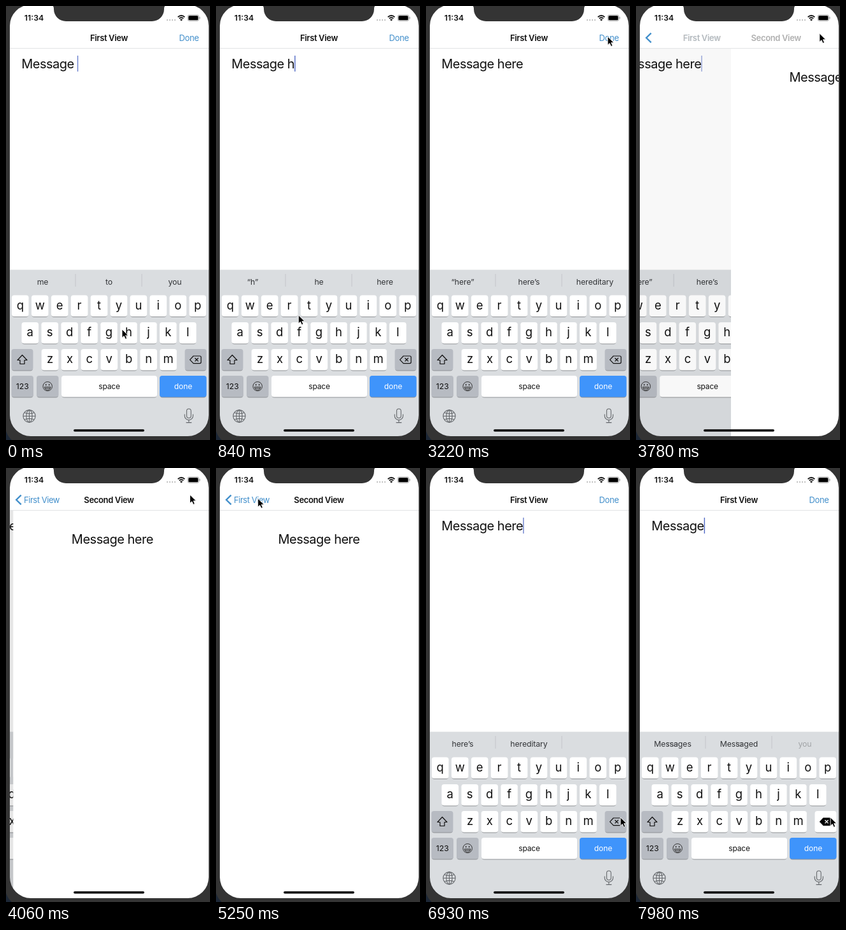
An HTML page for the animation above (8000 ms loop, 320 by 682 pixels).

```html
<!DOCTYPE html>
<html lang="en">
<head>
<meta charset="utf-8">
<title>Message form</title>
<style>
  html, body { margin: 0; width: 100%; height: 100%; overflow: hidden; background: #343434; }
  svg { display: block; width: 320px; height: 682px; }
  text { font-family: Inter, "Open Sans", sans-serif; font-optical-sizing: none; }
</style>
</head>
<body>
<svg id="stage" viewBox="0 0 320 682"></svg>
<script>
const LOOP = 8000, MID = 161.5, BLUE = '#428fcb';
const MESSAGE = 'Message\u00a0here';
const stage = document.getElementById('stage');

function el(tag, attrs, parent = stage) {
  const node = document.createElementNS('http://www.w3.org/2000/svg', tag);
  set(node, attrs);
  parent.appendChild(node);
  return node;
}
function set(node, attrs) {
  for (const k in attrs) node.setAttribute(k, attrs[k]);
}
const group = (parent = stage) => el('g', {}, parent);
const rect = (x, y, width, height, fill, parent, rx = 0) =>
  el('rect', { x, y, width, height, fill, rx }, parent);
const path = (d, attrs, parent) => el('path', { d, fill: 'none', ...attrs }, parent);
function label(str, x, y, size, attrs = {}, parent = stage) {
  const node = el('text', { x, y, 'font-size': size, 'text-anchor': 'middle', fill: '#111', ...attrs }, parent);
  node.textContent = str;
  return node;
}
const clamp = v => Math.max(0, Math.min(1, v));
const ramp = (t, a, b) => clamp((t - a) / (b - a));
const smooth = v => v * v * (3 - 2 * v);

// ---------- first view ----------
const FIELD_X = 24.2;
rect(0, 0, 320, 682, '#fff');
const first = group();
rect(6, 60, 312, 620, '#fff', first);
const field = label('', FIELD_X, 98, 20, { 'text-anchor': 'start', 'letter-spacing': -.5 }, first);
const caret = rect(0, 78, 1.4, 25, '#5069c4', first);

// ---------- keyboard ----------
const DARK = '#b7bbc2', STEP = 30.93;
const board = group(first);
const boardBack = rect(6, 414.5, 312, 266, '#dadde0', board);
const bars = [109, 213].map(x => rect(x - .5, 421, 1, 20, '#c3c6ca', board));
const hints = [0, 1].map(() => [57.5, MID, 265].map(x =>
  label('', x, 438, 12.3, { fill: '#333538', 'letter-spacing': -.1 }, board)));

const darkKeys = [];
function key(x, y, w, fill) {
  rect(x + .5, y + 2, w - 1, 32.5, '#8f9295', board, 4);
  const face = rect(x, y, w, 33.5, fill, board, 4);
  if (fill === DARK) darkKeys.push(face);
  return face;
}
const letters = [], spots = {};
[['qwertyuiop', 22.3, 454.5], ['asdfghjkl', 37.8, 497], ['zxcvbnm', 69, 539]].forEach(([row, x0, y]) => {
  [...row].forEach((ch, i) => {
    const x = x0 + i * STEP;
    key(x - 13.3, y, 26.6, '#fff');
    spots[ch] = [x, y];
    letters.push({ ch, y, node: label(ch, x, y, 18.5, {}, board) });
  });
});

const shiftKey = key(8.5, 539, 34, DARK);
const shiftIcon = path('M25.5 548.5L33 556.5H29V562.5H22V556.5H18Z',
  { stroke: '#111', 'stroke-width': 1.2, 'stroke-linejoin': 'round' }, board);
const eraseKey = key(280.5, 539, 34, DARK);
const eraseIcon = path('M288.5 555.8L294 550H304Q306 550 306 552V559.6Q306 561.6 304 561.6H294Z',
  { stroke: '#111', 'stroke-width': 1.2, 'stroke-linejoin': 'round' }, board);
const eraseCross = path('M296.4 553.2l5.2 5.2m0 -5.2l-5.2 5.2', { stroke: '#111', 'stroke-width': 1.3 }, board);

key(8.5, 581, 34.5, DARK);
key(48, 581, 34.5, DARK);
key(87, 581, 150, '#fff');
key(241, 581, 73.5, '#3f94fb');
label('123', 25.7, 602, 12.3, {}, board);
label('space', 162, 601.5, 12, { 'letter-spacing': -.2 }, board);
label('done', 278, 601.5, 12, { fill: '#fff' }, board);

const ink = { stroke: '#333', 'stroke-width': 1 };
el('circle', { cx: 65.2, cy: 597.7, r: 7.2, fill: 'none', ...ink }, board);
path('M60.4 598.8H70Q69.2 603.4 65.2 603.4T60.4 598.8ZM61.4 600.8H69', ink, board);
[62.7, 67.7].forEach(cx => el('ellipse', { cx, cy: 595.2, rx: .8, ry: 1.3, fill: '#333' }, board));

const thin = { stroke: '#64676b', 'stroke-width': 1.1 };
el('circle', { cx: 36.5, cy: 644.5, r: 9.6, fill: 'none', ...thin }, board);
el('ellipse', { cx: 36.5, cy: 644.5, rx: 4.6, ry: 9.6, fill: 'none', ...thin }, board);
path('M36.5 635V654M27 644.5H46M29 639Q36.5 642.5 44 639M29 650Q36.5 646.5 44 650', thin, board);
el('rect', { x: 283.4, y: 633, width: 6.8, height: 14.5, rx: 3.4, fill: 'none', ...thin }, board);
path('M280.2 641.5V644A6.6 6.6 0 0 0 293.4 644V641.5M286.8 650.8V654.6M282.5 654.6H291.2', thin, board);

const popup = group(board);
path('M-13.3 33V4C-13.3 -2 -20.5 -3 -20.5 -10V-38Q-20.5 -44 -14.5 -44H14.5Q20.5 -44 20.5 -38V-10C20.5 -3 13.3 -2 13.3 4V33Z',
  { fill: '#fff', stroke: '#b9bcc0', 'stroke-width': .7 }, popup);
const popupChar = label('', 0, -13, 28, {}, popup);

const shade = rect(6, 60, 320, 620, '#000');

// ---------- second view ----------
const second = group();
rect(6, 67, 320, 615, '#fff', second);
label(MESSAGE, MID, 119, 20, { 'letter-spacing': -.5 }, second);

// ---------- navigation and status bar ----------
rect(0, 0, 320, 67, '#fff');
rect(6, 66.3, 312, .8, '#d9dadc');
const bold = { 'font-weight': 600, 'letter-spacing': -.35 };
const firstTitle = label('First View', MID, 54.5, 13, bold);
const secondTitle = label('Second View', MID, 54.5, 13, bold);
const doneLink = label('Done', 287, 54.5, 13, { fill: BLUE, 'letter-spacing': -.35 });
const chevron = path('M23.7 42.6L16.2 50L23.7 57.4', { stroke: BLUE, 'stroke-width': 2.4 });
const backLink = label('First View', 56, 54.5, 13, { fill: BLUE, 'letter-spacing': -.45 });

label('11:34', 44, 23, 12.3, { 'font-weight': 600 });
for (let i = 0; i < 4; i++) el('circle', { cx: 253 + i * 4, cy: 22, r: 1.2, fill: '#c4c4c4' });
path('M269.6 17.4Q275 12.6 280.4 17.4M271.6 19.7Q275 16.7 278.4 19.7', { stroke: '#111', 'stroke-width': 1.8 });
path('M275 23.6L272.9 21.4Q275 19.7 277.1 21.4Z', { fill: '#111' });
el('rect', { x: 285, y: 14, width: 17.6, height: 9.4, rx: 2.6, fill: 'none', stroke: '#999', 'stroke-width': .8 });
rect(286.2, 15.2, 15.2, 7, '#000', stage, 1.5);
rect(303.4, 17, 1.1, 3.4, '#999', stage, .5);

// ---------- bezel ----------
path('M0 0H320V682H0ZM6 31A33 33 0 0 1 39 -2H70A5 6 0 0 1 75 4V5A19 19 0 0 0 94 24H229A19 19 0 0 0 248 5V4A5 6 0 0 1 253 -2H285A33 33 0 0 1 318 31V643A33 33 0 0 1 285 676H39A33 33 0 0 1 6 643Z',
  { fill: '#343434', 'fill-rule': 'evenodd' });
path('M0 668Q3 677 9 682H0Z', { fill: '#1c2736' });
rect(106, 665.3, 111, 3.5, '#000', stage, 1.75);

const pointer = path('M0 0V13.4L3.1 10.6L5.3 15.4L7.7 14.4L5.6 9.7H9.8Z',
  { fill: '#000', stroke: '#fff', 'stroke-width': .9, 'stroke-linejoin': 'round' });

// ---------- timeline ----------
const PUSH = 3660, POP = 5735, SETTLED = 6250, ERASE = 7000;
const edits = [[-450, 8], [430, 9], [1380, 10], [1850, 11], [2290, 12], [5940, 12],
  [7050, 11], [7520, 10], [7620, 9], [7720, 8], [7850, 7]];
const predictions = [
  [-999, 'me', 'to', 'you'],
  [480, '“h”', 'he', 'here'],
  [1430, '“he”', 'her', 'here'],
  [1900, '“her”', 'here', 'hers'],
  [2340, '“here”', 'here’s', 'hereditary'],
  [5000, '', '', ''],
  [6320, 'here’s', 'hereditary', ''],
  [7280, '“her”', 'here', 'hers'],
  [7540, '“he”', 'her', 'here'],
  [7640, '“h”', 'he', 'here'],
  [7735, 'me', 'to', 'you'],
  [7855, 'Messages', 'Messaged', '']
];
const taps = [['h', 380], ['e', 1280], ['r', 1760], ['e', 2200]];
const route = [[0, 182, 508], [550, 182, 508], [1100, 85, 467], [1420, 85, 467], [1600, 111, 470],
  [1950, 111, 470], [2150, 84, 468], [2450, 84, 468], [3100, 285, 48], [3600, 285, 48],
  [3850, 288.5, 42], [4440, 288.5, 42], [4830, 68, 49], [5200, 68, 49], [5390, 55, 43],
  [POP, 55, 43], [6020, 281.5, 394], [6560, 302, 546], [6640, 302, 546], [6720, 305, 549], [LOOP, 305, 549]];

const lastIndex = (list, t) => list.reduce((n, item, i) => item[0] <= t ? i : n, 0);

// critically damped spring from 0 to 1
function spring(ms) {
  const k = Math.max(0, ms) * .015;
  return 1 - (1 + k) * Math.exp(-k);
}

function blink(ms) {
  const m = ms % 1000;
  return ms < 450 ? 1 : 1 - ramp(m, 430, 580) + ramp(m, 940, 1000);
}

function drawField(t) {
  const [since, count] = edits[lastIndex(edits, t)];
  field.textContent = MESSAGE.slice(0, count);
  const atPop = t >= POP && t < 5940;
  set(caret, { x: FIELD_X + field.getComputedTextLength(), opacity: atPop ? 1 : blink(t - since) });
}

function drawHints(t) {
  const i = lastIndex(predictions, t);
  const now = predictions[i], before = predictions[Math.max(0, i - 1)];
  const age = t - now[0];
  hints.forEach((words, old) => words.forEach((node, n) => {
    const same = before[n + 1] === now[n + 1];
    node.textContent = (old ? before : now)[n + 1];
    const fade = old ? 1 - ramp(age, 0, 190) : ramp(age, 0, 120);
    set(node, { opacity: same ? 1 - old : fade });
  }));
}

function drawBoard(t) {
  const bare = t >= 5000 && t < SETTLED;
  const erasing = t >= ERASE;
  set(boardBack, { fill: bare ? '#fff' : '#dadde0' });
  bars.forEach(bar => set(bar, { fill: bare ? '#ededed' : '#c3c6ca' }));
  darkKeys.forEach(face => set(face, { fill: bare ? '#a9a9a9' : DARK }));
  set(shiftKey, { fill: bare ? '#fff' : DARK });
  set(shiftIcon, { fill: bare ? '#111' : 'none' });
  if (erasing) set(eraseKey, { fill: '#fff' });
  set(eraseIcon, { fill: erasing ? '#000' : 'none' });
  set(eraseCross, { stroke: erasing ? '#fff' : '#111' });
  letters.forEach(({ ch, y, node }) => {
    node.textContent = bare ? ch.toUpperCase() : ch;
    set(node, { y: y + (bare ? 23.3 : 22), 'font-size': bare ? 17 : 18.5 });
  });

  const tap = taps.find(([, at]) => t >= at && t < at + 120);
  set(popup, { opacity: tap ? 1 : 0 });
  if (tap) {
    popupChar.textContent = tap[0];
    set(popup, { transform: `translate(${spots[tap[0]]})` });
  }
}

function drawViews(t) {
  const p = t < POP ? spring(t - PUSH) : 1 - spring(t - POP);
  set(first, { transform: `translate(${-92 * p})` });
  set(shade, { opacity: .1 * p * p });
  set(second, { transform: `translate(${312 * (1 - p)})` });

  // the bar settles slightly ahead of the views
  const q = clamp(1.02 * p);
  set(firstTitle, { x: MID - 105.5 * q, opacity: clamp(1.1 - 1.5 * q) });
  set(secondTitle, { x: MID + 130 * (1 - q), opacity: clamp(1.5 * q - .5) });
  const donePress = t >= 3560 && t < POP ? .35 : 1;
  set(doneLink, { opacity: clamp(1 - 4 * q) * donePress });
  const backPress = t >= 5580 ? .35 : 1;
  set(chevron, { opacity: clamp(4 * q) * backPress });
  set(backLink, { x: 56 + 105.5 * (1 - q), opacity: clamp(2 * q - 1) * backPress });
}

function drawPointer(t) {
  const i = Math.min(lastIndex(route, t), route.length - 2);
  const [t0, x0, y0] = route[i], [t1, x1, y1] = route[i + 1];
  const f = smooth(ramp(t, t0, t1));
  set(pointer, { transform: `translate(${x0 + (x1 - x0) * f} ${y0 + (y1 - y0) * f})` });
}

function draw(t) {
  drawField(t);
  drawHints(t);
  drawBoard(t);
  drawViews(t);
  drawPointer(t);
}

const start = performance.now();
function tick() {
  draw((performance.now() - start) % LOOP);
  requestAnimationFrame(tick);
}
tick();
</script>
</body>
</html>
```
